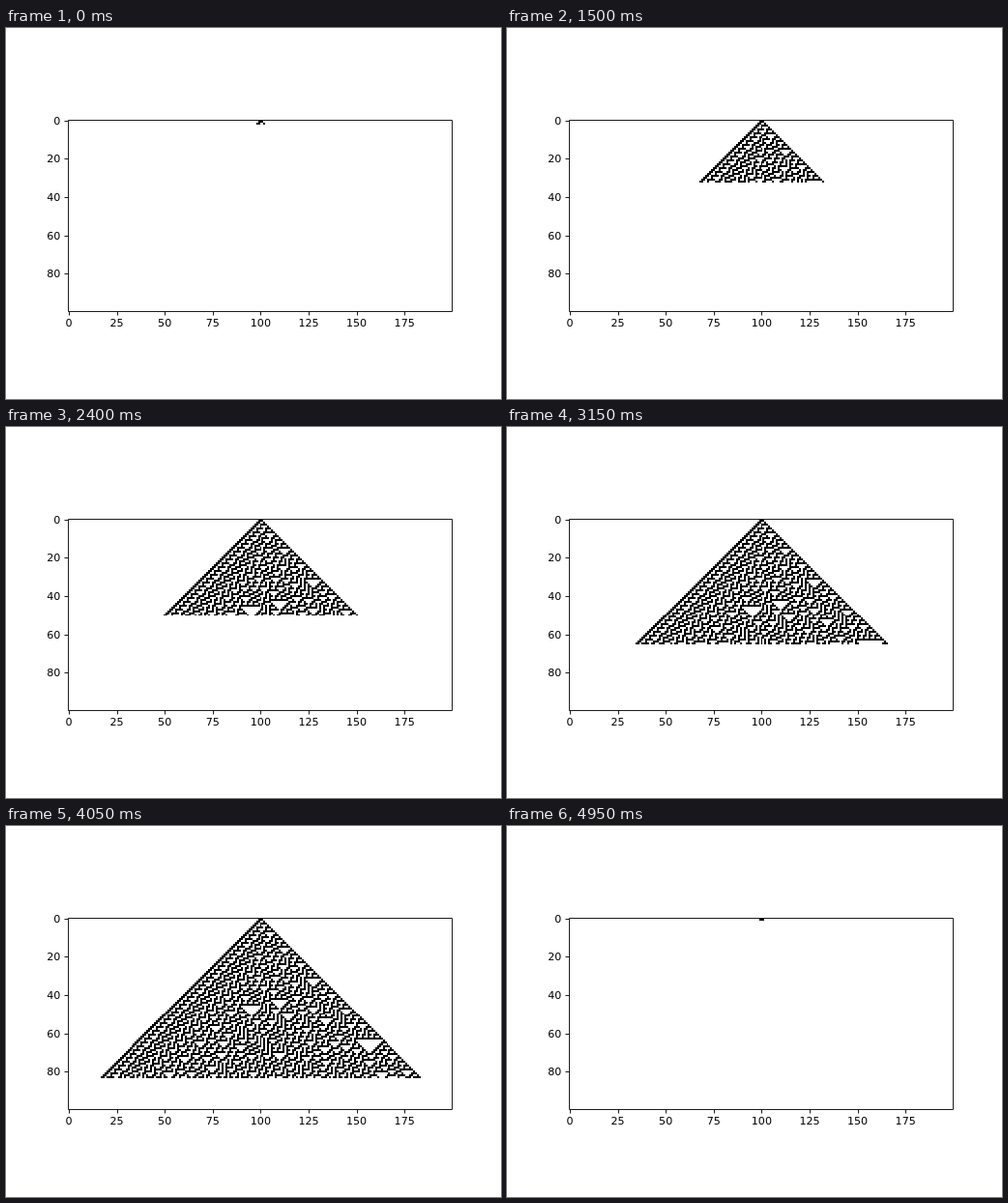
Write an HTML page that moves like this. It is 512 px wide and 384 px high and loops after 5 s.

```html
<!DOCTYPE html>
<html lang="en">
<head>
<meta charset="utf-8">
<title>Cellular automaton, rule 30</title>
<style>
  html, body { margin: 0; width: 100%; height: 100%; overflow: hidden; background: #fff; }
  svg { display: block; width: 512px; height: 384px; }
  text { font: 11.11px "DejaVu Sans", sans-serif; fill: #000; }
  #axes { fill: none; stroke: #000; stroke-width: 0.889; }
</style>
</head>
<body>
<svg viewBox="0 0 512 384">
  <rect width="512" height="384" fill="#fff"/>
  <path id="cells" shape-rendering="crispEdges"/>
  <path id="axes"/>
  <g id="labels"></g>
</svg>
<script>
const COLS = 200, ROWS = 100, STEP = 50;
const LEFT = 64, TOP = 94.72, CELL = 1.984;
const $ = id => document.getElementById(id);

// Cell edges snapped to whole pixels
const edgeX = c => LEFT + Math.round(c * 397 / COLS);
const edgeY = r => Math.max(95, 94 + Math.round(r * 199 / ROWS));

const nextRow = row => row.map((c, i) => (row[i - 1] || 0) ^ (c | (row[i + 1] || 0)));

function rowPath(row, r) {
  const y0 = edgeY(r), y1 = edgeY(r + 1);
  let d = "";
  for (let c = 0; c < COLS; c++) {
    if (!row[c]) continue;
    const start = c;
    while (c < COLS && row[c]) c++;
    d += `M${edgeX(start)} ${y0}H${edgeX(c)}V${y1}H${edgeX(start)}Z`;
  }
  return d;
}

// pictures[k] holds rows 0 to k
const pictures = [];
let row = Array.from({ length: COLS }, (_, i) => +(i === COLS / 2));
let drawn = "";
for (let r = 0; r < ROWS; r++) {
  drawn += rowPath(row, r);
  pictures.push(drawn);
  row = nextRow(row);
}

function addLabel(value, x, y, anchor) {
  const t = document.createElementNS("http://www.w3.org/2000/svg", "text");
  t.setAttribute("x", x);
  t.setAttribute("y", y);
  t.setAttribute("text-anchor", anchor);
  t.textContent = value;
  $("labels").append(t);
}

function drawAxes() {
  const snap = v => Math.floor(v + 0.5) + 0.5;
  let d = "M64.5 95.5H461.5V293.5H64.5Z";
  for (let v = 0; v < COLS; v += 25) {
    const x = LEFT + (v + 0.5) * CELL;
    d += `M${snap(x)} 293.5v4`;
    addLabel(v, x, 309, "middle");
  }
  for (let v = 0; v < ROWS; v += 20) {
    const y = TOP + (v + 0.5) * CELL;
    d += `M64.5 ${snap(y)}h-4`;
    addLabel(v, 56.4, Math.round(y + 4.05), "end");
  }
  $("axes").setAttribute("d", d);
}

let shown = -1;
function render(ms) {
  const last = (Math.floor(ms / STEP) + 2) % ROWS;
  if (last === shown) return;
  shown = last;
  $("cells").setAttribute("d", pictures[last]);
}

drawAxes();
const begin = performance.now();
function tick() {
  render(performance.now() - begin);
  requestAnimationFrame(tick);
}
render(0);
requestAnimationFrame(tick);
</script>
</body>
</html>
```
